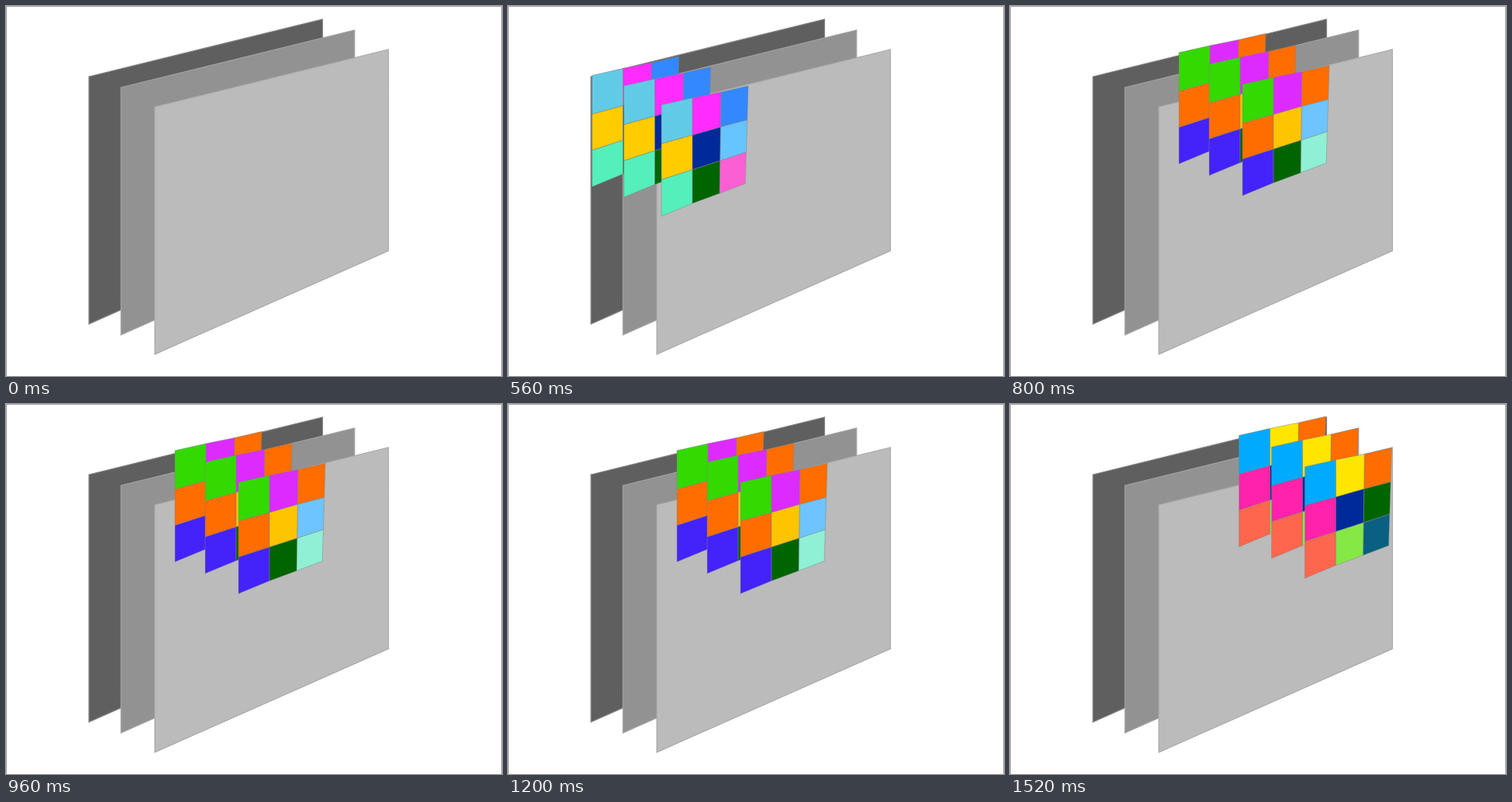
Write an HTML page that moves like this. It is 640 px wide and 477 px high and loops after 1600 ms.

```html
<!DOCTYPE html>
<html lang="en">
<head>
<meta charset="utf-8">
<title>Window sliding over three layers</title>
<style>
  html, body { margin: 0; width: 100%; height: 100%; overflow: hidden; background: #fff; }
  svg { display: block; width: 100%; height: 100%; }
</style>
</head>
<body>
<svg id="stage" viewBox="0 0 640 477"></svg>
<script>
const LOOP = 1600;
const stage = document.getElementById('stage');

function add(parent, tag, attrs) {
  const el = document.createElementNS('http://www.w3.org/2000/svg', tag);
  for (const key in attrs) el.setAttribute(key, attrs[key]);
  parent.appendChild(el);
  return el;
}

// Layers from back to front: top left corner, fill, edge
const layers = [
  [107, 91, '#5f5f5f', '#858585'],
  [148.3, 105, '#929292', '#a2a2a2'],
  [192, 130, '#bbbbbb', '#a9a9a9']
];
for (const [x, y, fill, stroke] of layers) {
  add(stage, 'path', {
    d: `M${x} ${y}l301.5 -74v259.5l-301.5 133.5z`,
    fill, stroke, 'stroke-width': 1.2
  });
}

// Grid columns in perspective: x at the top, drift per row, y of each row line
const columns = [
  { x: 198, drift: 0, y: [127.5, 177.5, 224, 271] },
  { x: 238, drift: 0, y: [118.5, 166.5, 211, 254.5] },
  { x: 275, drift: 0.6, y: [111, 156, 199.5, 241.5] },
  { x: 310, drift: 1.3, y: [103, 147, 188.5, 229] }
];
const corner = (c, r) => `${columns[c].x - columns[c].drift * r} ${columns[c].y[r]}`;

// Each stop: time span, grid offsets from back to front, cell colours by row
const stops = [
  {
    from: 400, to: 800,
    offsets: [[-89.5, -38], [-48.5, -24.5], [0, 0]],
    colors: ['#61cbe6', '#ff2bff', '#3388ff', '#ffcc00', '#002a99', '#66c4ff',
      '#54efba', '#006400', '#fa60d3']
  },
  {
    from: 800, to: 1280,
    offsets: [[20, -67.5], [59, -52.5], [102, -26.5]],
    colors: ['#33d900', '#dd2bff', '#ff6d00', '#ff6d00', '#ffc400', '#6dc4ff',
      '#4422fa', '#006400', '#8ff0d5']
  },
  {
    from: 1280, to: LOOP,
    offsets: [[97.5, -87], [139.5, -72], [182.5, -46.5]],
    colors: ['#00aaff', '#ffe600', '#ff6d00', '#ff22aa', '#002a99', '#006400',
      '#ff664d', '#85e845', '#0a6080']
  }
];

for (const stop of stops) {
  stop.group = add(stage, 'g', {
    stroke: '#808080', 'stroke-opacity': 0.6, 'stroke-width': 0.8
  });
  for (const [dx, dy] of stop.offsets) {
    const grid = add(stop.group, 'g', { transform: `translate(${dx} ${dy})` });
    stop.colors.forEach((fill, i) => {
      const c = i % 3, r = Math.floor(i / 3);
      const points = [corner(c, r), corner(c + 1, r), corner(c + 1, r + 1), corner(c, r + 1)];
      add(grid, 'polygon', { points: points.join(' '), fill });
    });
  }
}

add(stage, 'path', { d: 'M.5 477V.5H639.5V477', fill: 'none', stroke: '#a0a0a0' });

function draw(time) {
  const t = time % LOOP;
  for (const { group, from, to } of stops) {
    group.setAttribute('visibility', t >= from && t < to ? 'visible' : 'hidden');
  }
}

const start = performance.now();
function tick() {
  draw(performance.now() - start);
  requestAnimationFrame(tick);
}
tick();
</script>
</body>
</html>
```
